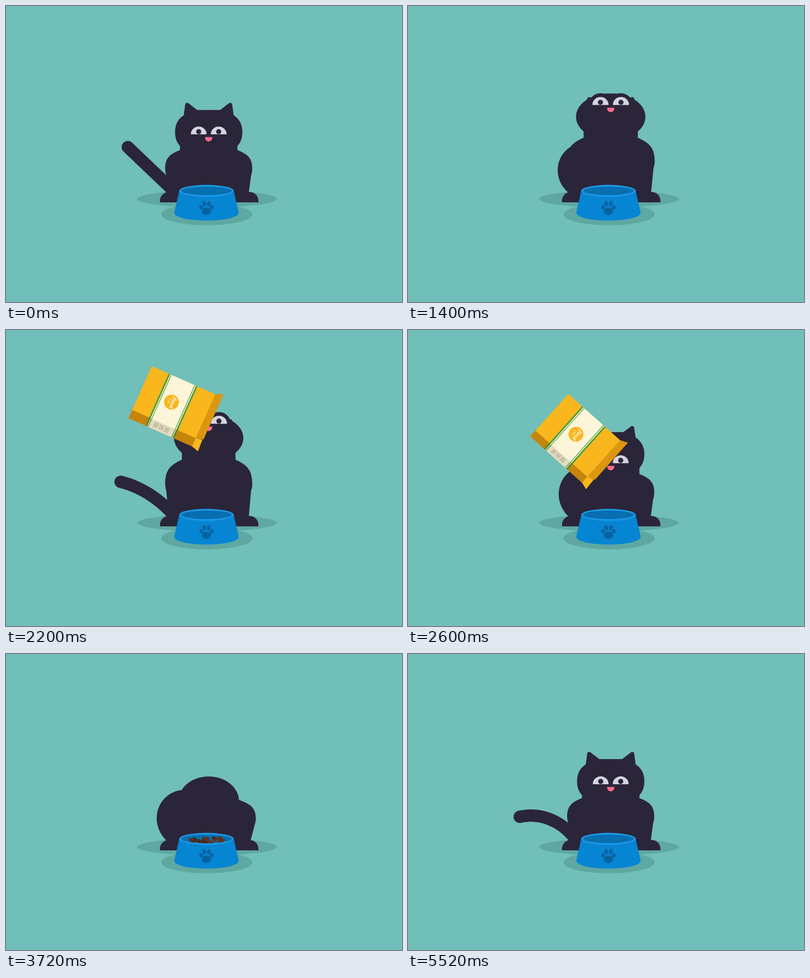
An HTML page with a canvas that plays this animation: 800x600 px, repeating every 5560 ms.

```html
<!DOCTYPE html>
<html lang="en">
<head>
<meta charset="utf-8">
<title>Hungry cat</title>
<style>
html, body { margin: 0; width: 100%; height: 100%; overflow: hidden; background: #70bfb8; }
canvas { display: block; }
</style>
</head>
<body>
<canvas id="stage" width="800" height="600"></canvas>
<script>
const ctx = document.getElementById('stage').getContext('2d');
const LOOP = 5560, STEP = 40, WAG = 1120, CX = 409.5, TAU = Math.PI * 2, RAD = Math.PI / 180;
const CAT = '#2b2539', SHADOW = '#5fa7a1', YELLOW = '#f9b61d', GREEN = '#4a9a2e';

// Cat poses: head y, face offset, ear direction, head rx, ry, neck half-width, neck y, body half-width, widest y, base half-width
const rising = [258, 6, -1, 68, 45, 58, 292, 88, 330, 81];
const tall = [252, 2, -1, 68, 45, 58, 292, 88, 330, 81];
const low = [281, 30, -1.04, 70.5, 47, 61, 309, 97, 343, 86];
const lookUp = [218, -30, -0.6, 70, 47, 54, 262, 88, 312, 81];
const wait = [252, 18, -0.96, 68, 45, 58, 292, 88, 330, 81];
const eat = [329, 75, 1, 57, 54, 42, 292, 100, 335, 87];
const catKeys = [
  [-120, rising], [160, tall], [420, tall], [800, low], [1130, low], [1480, lookUp],
  [2160, lookUp], [2500, wait], [3520, wait], [3880, eat], [4733, eat], [5520, rising], [5600, rising]
];

// Bag poses: centre x, y, angle, side thickness
const bagUp = [337, 220, 41.8, 16], bagDown = [339.5, 238, 46.5, 16];
const bagKeys = [
  [1540, [325, -112, -49.4, 27.5]], [2500, bagUp], [2600, bagUp], [2800, bagDown], [3000, bagUp],
  [3200, bagDown], [3400, bagUp], [3840, [325, -190, -40, 27]]
];

const clamp = (v, a = 0, b = 1) => Math.min(b, Math.max(a, v));
const ease = x => x < 0.5 ? 2 * x * x : 1 - 2 * (1 - x) ** 2;
const wave = t => Math.sin(TAU * t / WAG);
const rnd = i => { const v = Math.sin(i * 91.7 + 3.1) * 4375.5; return v - Math.floor(v); };

function pose(keys, t) {
  let i = 0;
  while (i < keys.length - 2 && t >= keys[i + 1][0]) i++;
  const [t0, a] = keys[i], [t1, b] = keys[i + 1];
  const k = ease(clamp((t - t0) / (t1 - t0)));
  return a.map((v, j) => v + (b[j] - v) * k);
}

function oval(color, x, y, rx, ry, turn = 0) {
  ctx.fillStyle = color;
  ctx.beginPath();
  ctx.ellipse(x, y, rx, ry, turn * RAD, 0, TAU);
  ctx.fill();
}

function box(color, x, y, w, h) {
  ctx.fillStyle = color;
  ctx.fillRect(x, y, w, h);
}

function poly(color, ...pts) {
  ctx.fillStyle = color;
  ctx.beginPath();
  pts.forEach(p => ctx.lineTo(...p));
  ctx.closePath();
  ctx.fill();
}

function kibble(i, x, y) {
  oval(i % 3 ? '#5f3320' : '#43261d', x, y, 4, 3.2);
}

function tail(t) {
  const base = 129 + 17 * wave(t + 80);
  const bend = -13 - 152 * wave(t - 15);
  const n = 30, len = 123;
  let x = 335, y = 371;
  ctx.strokeStyle = CAT;
  ctx.lineWidth = 25;
  ctx.lineCap = ctx.lineJoin = 'round';
  ctx.beginPath();
  ctx.moveTo(x, y);
  for (let i = 0; i < n; i++) {
    const s = (i + 0.5) / n;
    const dir = (base + bend * (0.85 * s + 0.15 * s * s)) * RAD;
    x += Math.cos(dir) * len / n;
    y -= Math.sin(dir) * len / n;
    ctx.lineTo(x, y);
  }
  ctx.stroke();
}

function body([hy, , , , , nw, ny, w, by, fw]) {
  const c1x = nw + 0.73 * (w - nw), c1y = ny + 0.23 * (by - ny), c2y = by - 0.55 * (by - ny);
  ctx.fillStyle = CAT;
  ctx.beginPath();
  ctx.moveTo(CX - nw, ny);
  ctx.bezierCurveTo(CX - c1x, c1y, CX - w, c2y, CX - w, by);
  ctx.quadraticCurveTo(CX - w, by + 7, CX - w + 2.5, by + 14);
  ctx.lineTo(CX - fw, 378);
  ctx.lineTo(CX + fw, 378);
  ctx.lineTo(CX + w - 2.5, by + 14);
  ctx.quadraticCurveTo(CX + w, by + 7, CX + w, by);
  ctx.bezierCurveTo(CX + w, c2y, CX + c1x, c1y, CX + nw, ny);
  ctx.fill();
  if (hy < ny) box(CAT, CX - nw, hy, nw * 2, ny - hy + 2);
  ctx.beginPath();
  ctx.roundRect(311, 377, 199, 21, [18, 18, 0, 0]);
  ctx.fill();
}

function ear(side, g) {
  const out = Math.max(0, g) * 6;
  ctx.beginPath();
  ctx.moveTo(side * 22, g * 20);
  ctx.lineTo(side * (46.5 + out), g * 33);
  ctx.lineTo(side * (43.5 + out), g * 55.5);
  ctx.lineTo(side * (20 + out), g * 37.5);
  ctx.closePath();
  ctx.fill();
  ctx.stroke();
}

function eye(x, y, r, open) {
  oval(CAT, x, y, r + 7.5, r + 7.5);
  ctx.save();
  ctx.beginPath();
  ctx.ellipse(x, y, r, r * open, 0, Math.PI, TAU);
  ctx.clip();
  box('#d6d3e0', x - r, y - r, r * 2, r);
  oval(CAT, x, y - 5.7 * open, 5.2, 5.2);
  ctx.restore();
}

function face(p) {
  const r = p < 0 ? 16.5 : 16.1, gap = p < 0 || p > 25 ? 20.7 : 20.2;
  const open = clamp((78 - p) / 60);
  const mouth = p + 5.5 + Math.max(0, p - 18) * 0.35;
  eye(-gap, p, r, open);
  eye(gap, p, r, open);
  ctx.fillStyle = '#ff6b8e';
  ctx.beginPath();
  ctx.ellipse(0, mouth + 1.5, 7.2, 7.4, 0, 0, Math.PI);
  ctx.lineTo(-7.2, mouth);
  ctx.lineTo(7.2, mouth);
  ctx.fill();
}

function head([hy, p, g, rx, ry]) {
  // Squarer when level, rounder when tilted up or down
  const k = 0.5523 + 0.12 * clamp((-g - 0.6) / 0.4), kx = rx * k, ky = ry * k;
  ctx.save();
  ctx.translate(CX, hy);
  ctx.fillStyle = ctx.strokeStyle = CAT;
  ctx.lineWidth = 8;
  ctx.lineJoin = 'round';
  ear(-1, g);
  ear(1, g);
  ctx.beginPath();
  ctx.moveTo(-rx, 0);
  ctx.bezierCurveTo(-rx, -ky, -kx, -ry, 0, -ry);
  ctx.bezierCurveTo(kx, -ry, rx, -ky, rx, 0);
  ctx.bezierCurveTo(rx, ky, kx, ry, 0, ry);
  ctx.bezierCurveTo(-kx, ry, -rx, ky, -rx, 0);
  ctx.fill();
  if (g < 0) box(CAT, -25, -ry, 50, ry);
  else oval(CAT, -4.5, 46 * g, 51, 8.5);
  if (p < 48) face(p);
  ctx.restore();
}

function bowl(t) {
  ctx.fillStyle = '#0685d3';
  ctx.beginPath();
  ctx.moveTo(350.5, 373);
  ctx.lineTo(340, 418);
  ctx.bezierCurveTo(337, 440.5, 473, 440.5, 470, 418);
  ctx.lineTo(459.5, 373);
  ctx.fill();
  oval('#1e98e5', 405, 374.7, 55, 12.2);
  oval('#076fb0', 405, 374.7, 51, 8.7);
  const level = clamp((t - 2950) / 560);
  if (level > 0 && t < 4760) {
    ctx.save();
    ctx.beginPath();
    ctx.ellipse(405, 374.7, 51, 8.7, 0, 0, TAU);
    ctx.clip();
    for (let i = 0; i < 34; i++) {
      kibble(i, 405 + (rnd(i) - 0.5) * 68, 390 - level * (6 + 11 * rnd(i + 50)));
    }
    ctx.restore();
  }
  const paw = '#08629f';
  oval(paw, 405, 416.2, 9.4, 7.4);
  for (const s of [-1, 1]) {
    oval(paw, 405 + s * 10.7, 408, 3.5, 4.5, s * 28);
    oval(paw, 405 + s * 4.7, 400.7, 3.6, 5.4, s * 12);
  }
}

function falling(t) {
  for (let i = 0; i < 20; i++) {
    const start = (i < 10 ? 2790 : 3210) + (i % 10) * 12;
    const k = (t - start) / 230;
    if (k < 0 || k > 1) continue;
    const x = 375 + rnd(i + 9) * 45, goal = 405 + (rnd(i + 20) - 0.5) * 66;
    kibble(i, x + (goal - x) * k, 275 + 102 * k * k);
  }
}

function bag(t) {
  if (t < 1540 || t > 3840) return;
  const [x, y, angle, side] = pose(bagKeys, t);
  ctx.save();
  ctx.translate(x, y);
  ctx.rotate(angle * RAD);
  ctx.translate(-70, 57);
  box(YELLOW, 0, -115.5, 141, 115.5);
  box('#c4850c', 0, -side, 141, side);
  poly('#db970f', [140.5, -115.5], [155.5, -122.5], [156, -22], [140.5, -side]);
  poly(YELLOW, [140.5, 0], [155.5, 4.5], [154, -21], [140.5, -side]);

  box('#fdf5d9', 37.5, -115.5, 63.5, 115.5);
  box('#e3dcc0', 37.5, -side, 63.5, side);
  for (const [u, w] of [[37.5, 3.2], [42.6, 1.3], [94.6, 1.3], [97.8, 3.2]]) {
    box(GREEN, u, -115.5, w, 115.5);
    box('rgba(60,70,0,.25)', u, -side, w, side);
  }
  for (let i = 0; i < 15; i++) {
    box('#aaa48e', 52 + Math.floor(i / 5) * 12 + (i % 5) * 1.9, -side * 0.82, 0.9, side * (0.5 + 0.15 * rnd(i)));
  }

  oval(YELLOW, 66, -65, 15, 15);
  ctx.translate(66, -65);
  ctx.rotate(Math.PI / 2);
  ctx.fillStyle = '#fff';
  ctx.textAlign = 'center';
  ctx.font = 'italic 700 10px "Noto Serif", serif';
  ctx.fillText('food', 0, 0);
  ctx.font = '6px Lato, sans-serif';
  ctx.fillText('CAT', 0, 7);
  ctx.restore();
}

function draw(t) {
  const cat = pose(catKeys, t);
  if (t > 3880 && t < 4733) cat[0] -= 1.5 * (1 - Math.cos(TAU * (t - 3880) / (640 / 3)));
  const overBowl = cat[2] > 0;
  box('#70bfb8', 0, 0, 800, 600);
  oval(SHADOW, 406, 391, 141, 17);
  oval(SHADOW, 406, 422.5, 92, 22);
  tail(t);
  body(cat);
  if (!overBowl) head(cat);
  bowl(t);
  if (overBowl) head(cat);
  falling(t);
  bag(t);
}

const begin = performance.now();
function tick() {
  const t = (performance.now() - begin) % LOOP;
  draw(Math.floor(t / STEP) * STEP);
  requestAnimationFrame(tick);
}
tick();
</script>
</body>
</html>
```
